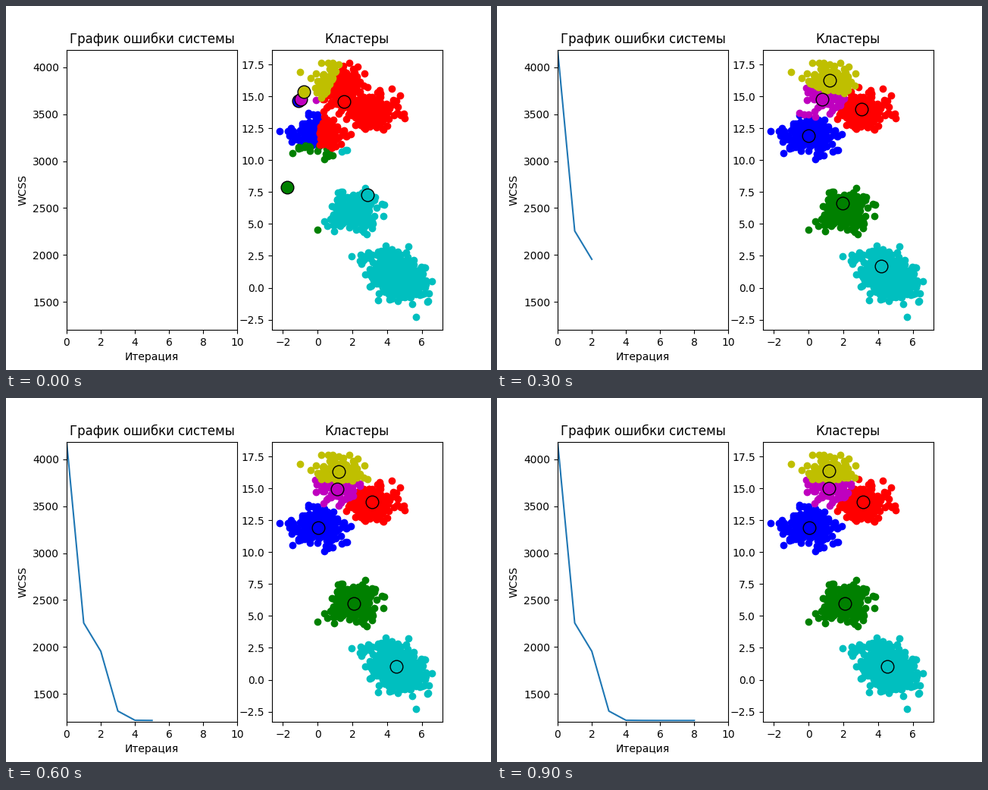
Recreate the animation shown at these times as a matplotlib script. Size 640x480 px, loop 1 s.

```python
import numpy as np
import matplotlib.pyplot as plt
from matplotlib.animation import FuncAnimation

FRAMES = 10
COLORS = "bgrcmy"
BLOB_SIZE = 200

# Centre and spread of each blob
BLOBS = [
    ((0.05, 11.95), (0.76, 0.72)),
    ((2.05, 6.05), (0.74, 0.72)),
    ((3.20, 14.05), (0.72, 0.72)),
    ((1.15, 15.80), (0.68, 0.80)),
    ((4.10, 1.60), (0.74, 0.72)),
    ((4.90, 0.35), (0.74, 0.72)),
]
OUTLIERS = [(-2.2, 12.3), (-1.0, 16.93), (-0.1, 14.74), (1.62, 10.8),
            (5.67, -2.28), (0.0, 4.54), (1.97, 2.46), (4.8, 13.5)]

# One starting centroid per colour
START = np.array([(-1.09, 14.68), (-1.75, 7.90), (1.53, 14.59),
                  (2.87, 7.29), (-0.96, 14.80), (-0.79, 15.36)])


def make_blob(rng, centre, spread):
    """Gaussian cloud: evenly graded radii at random angles."""
    radius = np.sqrt(-2 * np.log(np.linspace(0.02, 1, BLOB_SIZE)))
    angle = rng.uniform(0, 2 * np.pi, BLOB_SIZE)
    unit = np.column_stack([np.cos(angle), np.sin(angle)])
    return np.array(centre) + np.array(spread) * radius[:, None] * unit


def k_means(points, centres, steps):
    """Return (centres, labels, total distance) for every step."""
    history = []
    for _ in range(steps):
        distance = np.linalg.norm(points[:, None] - centres, axis=2)
        labels = distance.argmin(axis=1)
        history.append((centres, labels, distance.min(axis=1).sum()))
        centres = np.array([points[labels == k].mean(axis=0) if (labels == k).any()
                            else centre for k, centre in enumerate(centres)])
    return history


rng = np.random.default_rng(7)
points = np.vstack([make_blob(rng, *blob) for blob in BLOBS] + [OUTLIERS])
history = k_means(points, START, FRAMES)

# Fit the error curve to the fixed axis
errors = np.array([total for _, _, total in history])
errors = np.interp(errors, [errors.min(), errors.max()], [1217, 4187])

fig, (error_ax, cluster_ax) = plt.subplots(1, 2, figsize=(6.4, 4.8), dpi=100)
error_ax.set(title="График ошибки системы", xlabel="Итерация", ylabel="WCSS",
             xlim=(0, 10), ylim=(1201.5, 4187))
cluster_ax.set(title="Кластеры", xlim=(-2.649, 7.181), ylim=(-3.308, 18.659))

error_line, = error_ax.plot([], [])
clouds = [cluster_ax.plot([], [], "o", color=c, ms=6, mew=1)[0] for c in COLORS]
centroids = [cluster_ax.plot([], [], "o", mfc=c, mec="k", ms=12, mew=1)[0]
             for c in COLORS]


def update(frame):
    centres, labels, _ = history[frame]
    for k, (cloud, centroid) in enumerate(zip(clouds, centroids)):
        cloud.set_data(*points[labels == k].T)
        centroid.set_data(*centres[k][:, None])
    error_line.set_data(range(frame), errors[:frame])
    return [error_line, *clouds, *centroids]


anim = FuncAnimation(fig, update, frames=FRAMES, interval=100, repeat=True,
                     repeat_delay=0)
plt.show()
```
